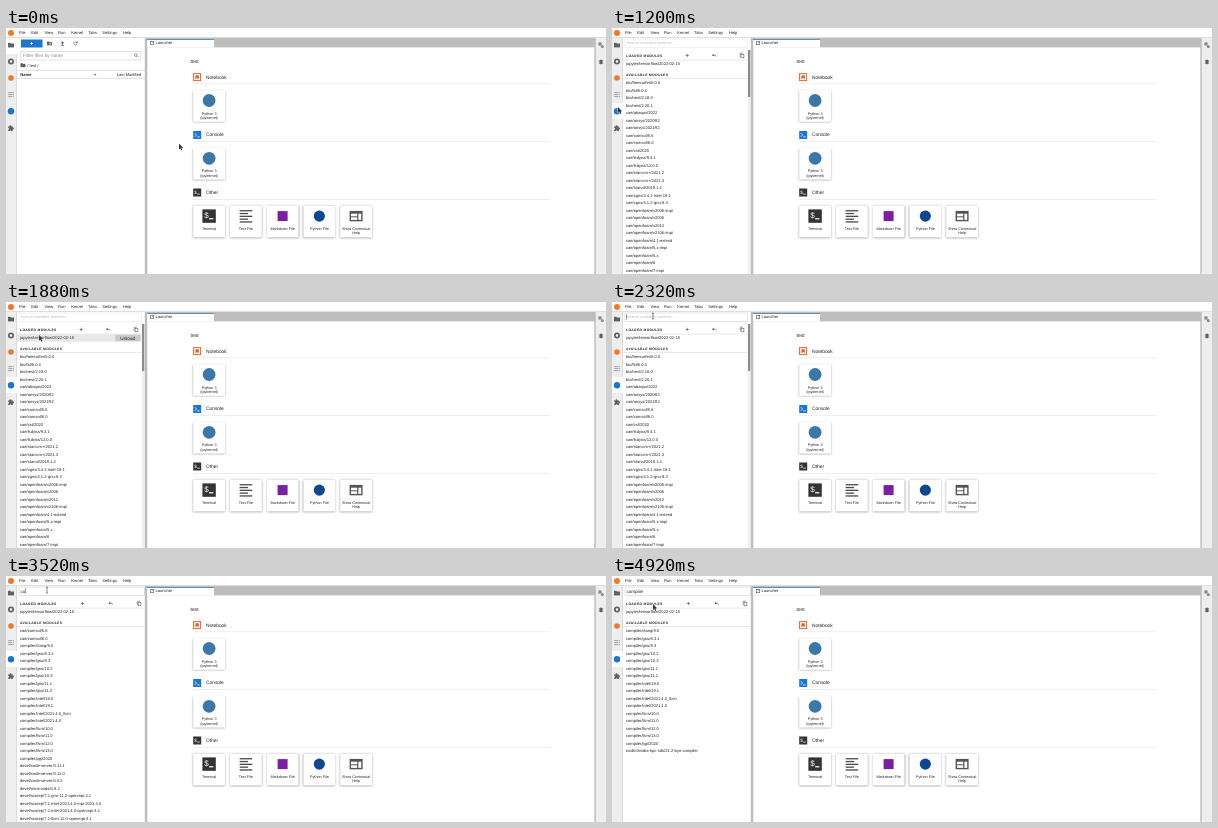
An HTML page with a canvas that plays this animation: 600x246 px, repeating every 5000 ms.

```html
<!DOCTYPE html>
<html lang="en">
<head>
<meta charset="utf-8">
<title>Module browser</title>
<style>
  html, body { margin: 0; width: 100%; height: 100%; overflow: hidden; background: #fff; }
  canvas { display: block; width: 600px; height: 246px; }
</style>
</head>
<body>
<canvas id="stage"></canvas>
<script>
const W = 600, H = 246, LOOP = 5000;
const cv = document.getElementById('stage');
const g = cv.getContext('2d');
const dpr = window.devicePixelRatio || 1;
cv.width = W * dpr;
cv.height = H * dpr;

const FONT = '"Liberation Sans", Arial, sans-serif';
const INK = '#222', ICON = '#616161', LINE = '#d0d0d0', BAR = '#bdbdbd';
const BLUE = '#1976d2', ORANGE = '#f37726';
const ROW = 7.5, LIST_Y = 54.8, LOADED_Y = 36;

const expand = (base, list) => list.split(' ').map(v => base + v);

const COMSOL = expand('cae/comsol/', '5.6 6.0');
const COMPILERS = expand('compiler/',
  'clang/9.0 gnu/8.3.1 gnu/9.3 gnu/10.2 gnu/10.3 gnu/11.1 gnu/11.2 intel/19.0 intel/19.1 ' +
  'intel/2021.4.0_llvm intel/2021.4.0 llvm/10.0 llvm/11.0 llvm/12.0 llvm/13.0 pgi/2020');
const TOOLKIT = ['toolkit/nvidia-hpc-sdk/21.2-byo-compiler'];
const ALL = [
  ...expand('bio/', 'freesurfer/6.0.0 fsl/6.0.4 nest/2.18.0 nest/2.20.1'),
  ...expand('cae/', 'abaqus/2022 ansys/2020R2 ansys/2021R2'),
  ...COMSOL,
  ...expand('cae/', 'cst/2020 lsdyna/9.3.1 lsdyna/12.0.0 starccm+/2021.2 starccm+/2021.3 ' +
    'starcd/2019.1.2 cgns/3.4.1-intel-19.1 cgns/4.1.2-gnu-8.3'),
  ...expand('cae/openfoam/', 'v2006-impi v2006 v2012 v2106-impi 4.1-extend 5.x-impi 5.x 6 7-impi')
];
const CO = [
  ...COMSOL, ...COMPILERS,
  ...expand('devel/', 'code-server/3.11.1 code-server/3.12.0 code-server/4.0.2 miniconda/4.9.2'),
  ...expand('devel/scorep/7.1-', 'gnu-11.2-openmpi-4.1 intel-2021.4.0-mpi-2021.4.0 ' +
    'intel-2021.4.0-openmpi-4.1 llvm-12.0-openmpi-4.1')
];
const COM = [...COMSOL, ...COMPILERS, ...TOOLKIT];
const COMP = [...COMPILERS, ...TOOLKIT];

const KEYS = [3320, 3520, 3680, 4000, 4080, 4280, 4400, 4480];
const LISTS = [ALL, ALL, CO, COM];

// Pointer moves: step times, start, end, easing power per axis
const MOVES = [
  { at: [80, 160, 240, 320, 400, 440, 520, 600], from: [173, 115.5], to: [6, 79], pow: [1.5, 1.5] },
  { at: [1520, 1600, 1680, 1760, 1840, 1880, 1920, 2000], from: [6, 79], to: [35, 22], pow: [1.9, 1.2] },
  { at: [2080, 2120, 2160, 2240, 2320], from: [35, 22], to: [41, 14], pow: [1, 1] },
  { at: [4880, 4920], from: [41, 14], to: [41, 28], pow: [1, 1] }
];

const passed = (times, t) => times.filter(s => t >= s).length;

function pointer(t) {
  let p = MOVES[0].from;
  for (const m of MOVES) {
    const k = passed(m.at, t) / m.at.length;
    if (!k) break;
    p = m.from.map((a, i) => a + (m.to[i] - a) * (1 - (1 - k) ** m.pow[i]));
  }
  return p;
}

function rect(x, y, w, h, color) {
  g.fillStyle = color;
  g.fillRect(x, y, w, h);
}
function frame(x, y, w, h, color, lw = 0.5) {
  g.strokeStyle = color;
  g.lineWidth = lw;
  g.strokeRect(x, y, w, h);
}
function disc(x, y, r, color) {
  g.fillStyle = color;
  g.beginPath();
  g.arc(x, y, r, 0, 7);
  g.fill();
}
function ring(x, y, r, color, lw, a = 0, b = 6.2832) {
  g.strokeStyle = color;
  g.lineWidth = lw;
  g.beginPath();
  g.arc(x, y, r, a, b);
  g.stroke();
}
function trace(pts) {
  g.beginPath();
  for (let i = 0; i < pts.length; i += 2) g.lineTo(pts[i], pts[i + 1]);
}
function line(pts, color, lw = 0.6) {
  trace(pts);
  g.strokeStyle = color;
  g.lineWidth = lw;
  g.stroke();
}
function poly(pts, color) {
  trace(pts);
  g.closePath();
  g.fillStyle = color;
  g.fill();
}
// y is the middle of the capitals
function text(s, x, y, size = 4.08, o = {}) {
  g.font = (o.bold ? 'bold ' : '') + size + 'px ' + FONT;
  g.textRendering = 'geometricPrecision';
  g.letterSpacing = (o.gap || 0) + 'px';
  g.textAlign = o.align || 'left';
  g.fillStyle = o.color || INK;
  g.fillText(s, x, y + size * 0.36);
}

function folder(x, y, w, color) {
  rect(x, y, w * 0.45, w * 0.2, color);
  rect(x, y + w * 0.12, w, w * 0.65, color);
}
function plus(x, y, r, color) {
  line([x - r, y, x + r, y], color, 0.7);
  line([x, y - r, x, y + r], color, 0.7);
}
function gear(x, y, r) {
  for (let i = 0; i < 8; i++) {
    const c = Math.cos(i * Math.PI / 4), s = Math.sin(i * Math.PI / 4);
    line([x + c * r * 0.7, y + s * r * 0.7, x + c * r * 1.25, y + s * r * 1.25], ICON, 0.7);
  }
  ring(x, y, r * 0.7, ICON, 0.8);
}
function prompt(x, y, s, color) {
  rect(x, y, s, s, color);
  line([x + s * 0.2, y + s * 0.27, x + s * 0.42, y + s * 0.5, x + s * 0.2, y + s * 0.73], '#fff', s * 0.09);
  line([x + s * 0.5, y + s * 0.74, x + s * 0.82, y + s * 0.74], '#fff', s * 0.09);
}
function shell(x, y, s) {
  rect(x, y, s, s, '#333');
  text('$', x + s * 0.13, y + s * 0.42, s * 0.6, { color: '#fff' });
  line([x + s * 0.5, y + s * 0.7, x + s * 0.82, y + s * 0.7], '#fff', s * 0.09);
}

function drawMenu() {
  rect(0, 0, W, 9.5, '#fff');
  rect(0, 9.3, W, 0.7, LINE);
  disc(5, 5, 3, ORANGE);
  const names = ['File', 'Edit', 'View', 'Run', 'Kernel', 'Tabs', 'Settings', 'Help'];
  const xs = [13, 25.3, 38.4, 52, 65.2, 82.3, 96.2, 117];
  names.forEach((n, i) => text(n, xs[i], 4.5));
}

function drawSidebars(open) {
  rect(0, 10, 10.5, H, '#eee');
  rect(10.3, 10, 0.7, H, LINE);
  rect(0, open ? 75 : 10, 11, 16, '#fff');
  folder(2, 14.8, 6, ICON);
  disc(5, 33.5, 3, ICON);
  rect(3.9, 32.4, 2.2, 2.2, '#fff');
  disc(5, 50, 2.8, ORANGE);
  for (let i = 0; i < 3; i++) {
    rect(2.2, 64.3 + i * 2, 4.2, 0.8, '#8a8a8a');
    rect(7, 64.3 + i * 2, 0.9, 0.8, '#8a8a8a');
  }
  disc(5, 83.3, 3.2, BLUE);
  rect(2.2, 98.4, 4.6, 4.6, ICON);
  disc(4.5, 98.2, 1, ICON);
  disc(7, 100.6, 1, ICON);
  disc(2.4, 100.7, 0.7, '#eee');
  disc(4.5, 103, 0.7, '#eee');

  rect(589.5, 10, 10.5, H, '#eee');
  gear(594, 16, 1.5);
  gear(596.3, 18.7, 1.1);
  g.fillStyle = ICON;
  g.beginPath();
  g.ellipse(595, 34, 1.5, 2.4, 0, 0, 7);
  g.fill();
  for (let i = -1; i < 2; i++) line([592.7, 34 + i * 1.4, 597.3, 34 + i * 1.4], ICON, 0.5);
}

function drawFiles() {
  rect(15, 11.5, 21.5, 8, BLUE);
  plus(25.5, 15.5, 1.5, '#fff');
  folder(41, 13.5, 5, ICON);
  plus(44.2, 15.8, 0.8, '#fff');
  poly([56.5, 13, 58.2, 15.2, 54.8, 15.2], ICON);
  rect(56, 15, 1, 1.8, ICON);
  rect(54.8, 17.2, 3.4, 0.7, ICON);
  ring(69.5, 15.5, 1.7, ICON, 0.6, 0.4, 5.4);
  poly([71.6, 13, 71.6, 15.2, 69.6, 15.2], ICON);
  frame(14.8, 23.3, 120, 8.7, '#c4c4c4');
  text('Filter files by name', 17, 27.7, 4.75, { color: '#8a8a8a' });
  ring(129.8, 27, 1.4, ICON, 0.6);
  line([130.8, 28, 132.4, 29.6], ICON);
  folder(14.5, 35.3, 5, ICON);
  text('/ test /', 21.3, 37.5);
  rect(11, 42, 128, 0.6, LINE);
  text('Name', 14.3, 46.3, 4.1, { bold: true });
  poly([87.6, 47.2, 90.4, 47.2, 89, 45.6], ICON);
  text('Last Modified', 110.8, 46.3);
  rect(11, 50, 128, 0.6, LINE);
}

function drawRow(name, y, px, py, action) {
  const top = y - ROW / 2;
  if (px > 12 && px < 135 && py >= top && py < top + ROW) {
    rect(11, top, 124.5, ROW, '#e8e8e8');
    rect(109.3, top + 0.5, 25, ROW - 1, '#cacaca');
    text(action, 121.7, y, 4.7, { align: 'center' });
  }
  text(name, 14, y);
}

function drawModules(t, px, py) {
  const typed = passed(KEYS, t);
  const long = typed < 2;
  const word = 'compiler'.slice(0, typed);
  const focus = t >= 2320;
  const right = long ? 135.5 : 138.5;
  frame(13, 11, right - 13, 8.7, focus ? '#c8c8c8' : '#e2e2e2', 0.5);
  if (typed) text(word, 14.5, 15, 4.5);
  else text('Search available modules...', 14.5, 15, 3.95, { color: '#bdbdbd' });
  if (focus && t < 4720) {
    g.font = '4.5px ' + FONT;
    g.letterSpacing = '0px';
    rect(14.3 + (typed ? g.measureText(word).width + 0.5 : 0), 12.3, 0.5, 5.4, '#333');
  }

  const head = { bold: true, gap: 0.32 };
  text('LOADED MODULES', 14, 27.5, 3.4, head);
  const ix = long ? 75.2 : 76.4, ux = long ? 102 : 104.5, cx = right - 5.3;
  plus(ix, 27.5, 1.7, ICON);
  poly([ux - 2.2, 27.2, ux - 0.3, 25.8, ux - 0.3, 28.6], ICON);
  line([ux - 0.8, 27.2, ux + 1.3, 27.2, ux + 2, 28.6], ICON, 0.7);
  frame(cx - 1.1, 26.3, 2.8, 3.5, ICON, 0.6);
  line([cx - 2, 28.9, cx - 2, 25.2, cx + 0.8, 25.2], ICON, 0.6);
  rect(11, 31.8, right - 11, 0.5, LINE);
  drawRow('jupyter/tensorflow/2022-02-15', LOADED_Y, px, py, 'Unload');

  text('AVAILABLE MODULES', 14, 46.5, 3.4, head);
  rect(11, 50.3, right - 11, 0.5, LINE);
  const list = LISTS[typed] || COMP;
  list.forEach((n, i) => drawRow(n, LIST_Y + i * ROW, px, py, 'Load'));

  if (long) {
    rect(135.7, 22, 3, H, '#f0f0f0');
    rect(136, 22, 2.3, 47, '#8c8c8c');
  }
}

function card(i, y, lines, icon) {
  const x = 187.2 + i * 36.75;
  g.save();
  g.shadowColor = 'rgba(0,0,0,0.38)';
  g.shadowBlur = 2 * dpr;
  g.shadowOffsetY = 0.5 * dpr;
  rect(x, y, 31.8, 31.6, '#fff');
  g.restore();
  icon(x + 15.9, y + 10.3);
  lines.forEach((s, k) => text(s, x + 15.9, y + 23 + k * 4.3, 3.75, { align: 'center' }));
}

function drawLauncher() {
  rect(138.8, 10, 451, H, BAR);
  rect(141.3, 19.4, 447, H, '#fff');
  rect(141, 11.3, 67, 8.2, '#fff');
  rect(141, 11, 67, 1, '#5b8fc7');
  frame(144.5, 13.5, 3.2, 3.2, ICON, 0.6);
  line([146, 15.2, 148.3, 12.9], ICON, 0.6);
  text('Launcher', 149.4, 15);

  text('test', 184.6, 33.3, 5);
  ['Notebook', 'Console', 'Other'].forEach((s, i) => {
    const y = 49 + i * 57.7;
    text(s, 200, y, 4.85);
    rect(187, y + 6.6, 357, 0.5, '#ddd');
  });
  frame(187.6, 45.6, 7, 7, '#e0642b', 1);
  poly([189.4, 47.2, 192.9, 47.2, 192.9, 51.4, 191.15, 49.9, 189.4, 51.4], '#e0642b');
  prompt(187.2, 103, 8, BLUE);
  shell(187.2, 160.5, 8);

  const kernel = (x, y) => disc(x, y, 6.4, '#3b77a8');
  card(0, 62.2, ['Python 3', '(ipykernel)'], kernel);
  card(0, 120, ['Python 3', '(ipykernel)'], kernel);
  const y = 177.8;
  card(0, y, ['Terminal'], (cx, cy) => shell(cx - 6.7, cy - 6.7, 13.4));
  card(1, y, ['Text File'], (cx, cy) => {
    for (let i = 0; i < 5; i++) rect(cx - 6.2, cy - 6 + i * 2.8, i % 2 ? 8.4 : 12.6, 1.3, '#4a4a4a');
  });
  card(2, y, ['Markdown File'], (cx, cy) => rect(cx - 5, cy - 5, 10, 10, '#7b1fa2'));
  card(3, y, ['Python File'], (cx, cy) => disc(cx, cy, 5.6, '#0d478f'));
  card(4, y, ['Show Contextual', 'Help'], (cx, cy) => {
    rect(cx - 6.5, cy - 5.2, 13, 10.4, '#555');
    rect(cx - 5.1, cy - 2.4, 6.2, 2.6, '#fff');
    rect(cx - 5.1, cy + 1.2, 6.2, 2.6, '#fff');
    rect(cx + 2.3, cy - 2.4, 2.8, 6.2, '#fff');
  });
}

function drawPointer(x, y) {
  g.save();
  g.translate(x, y);
  if (x > 13 && x < 135 && y < 19.7) {
    line([0, -2.8, 0, 2.8], '#333', 0.6);
    line([-1.1, -2.9, 1.1, -2.9], '#333', 0.5);
    line([-1.1, 2.9, 1.1, 2.9], '#333', 0.5);
  } else {
    const arrow = [0, 0, 0, 6, 1.4, 4.9, 2.4, 7, 3.4, 6.5, 2.4, 4.5, 4.2, 4.3];
    trace(arrow);
    g.closePath();
    g.strokeStyle = '#fff';
    g.lineWidth = 0.8;
    g.stroke();
    poly(arrow, '#3a3a3a');
  }
  g.restore();
}

function draw(t) {
  const [px, py] = pointer(t);
  const open = t >= 1200;
  g.setTransform(dpr, 0, 0, dpr, 0, 0);
  rect(0, 0, W, H, '#fff');
  drawSidebars(open);
  if (open) drawModules(t, px, py);
  else drawFiles();
  drawLauncher();
  drawMenu();
  drawPointer(px, py);
}

const start = performance.now();
function tick() {
  draw((performance.now() - start) % LOOP);
  requestAnimationFrame(tick);
}
tick();
</script>
</body>
</html>
```
